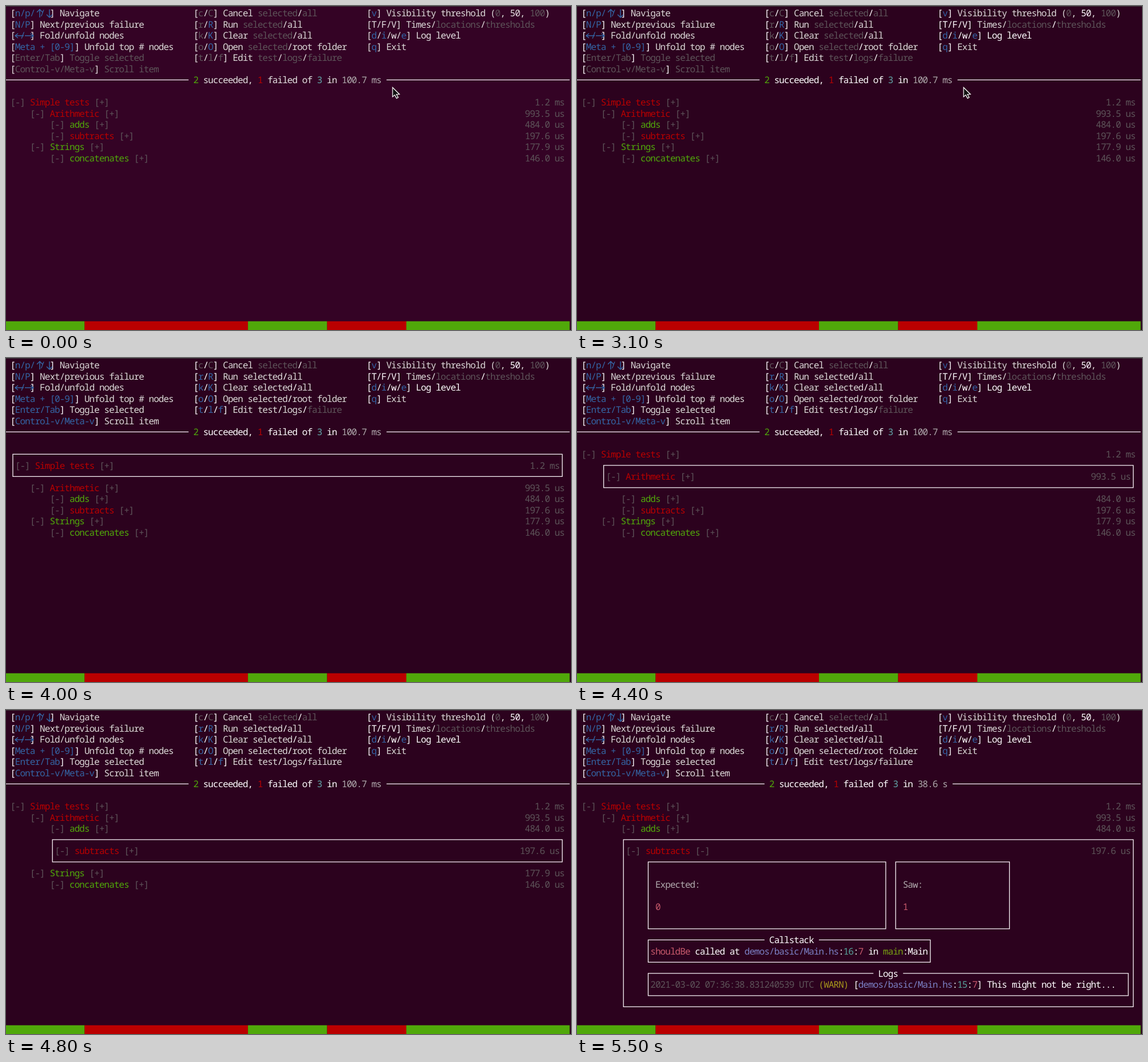
Recreate the animation shown at these times as an HTML page. Size 988 px wide and 567 px high, loop 8.8 s.

```html
<!DOCTYPE html>
<html lang="en">
<head>
<meta charset="utf-8">
<title>Test runner</title>
<style>
html, body { margin: 0; width: 100%; height: 100%; overflow: hidden; background: #2c021e; }
svg { display: block; width: 988px; height: 567px; }
text {
  font: 16px "Noto Sans Mono", "DejaVu Sans Mono", monospace;
  letter-spacing: -0.945px;
  white-space: pre;
  text-rendering: geometricPrecision;
}
.line { fill: none; stroke: #f8f4f6; stroke-width: 1.3; }
.arrow { fill: none; stroke: #3465a4; stroke-width: 1.5; }
</style>
</head>
<body>
<svg id="stage" viewBox="0 0 988 567"></svg>
<script>
const stage = document.getElementById('stage');
const LOOP = 8800, CW = 8.655, RH = 19.5, COLS = 114;

const colors = {
  w: '#dcdad8', h: '#ffffff', d: '#5d5459', b: '#3465a4', g: '#50a80a', r: '#b80000',
  c: '#62a5aa', s: '#b0aaad', p: '#c85a6c', v: '#7b80c4', t: '#56a59c', m: '#78a012', y: '#a8991c'
};

const nodes = [
  { depth: 0, name: 'Simple tests', color: 'r', time: '1.2 ms' },
  { depth: 1, name: 'Arithmetic', color: 'r', time: '993.5 us' },
  { depth: 2, name: 'adds', color: 'g', time: '484.0 us' },
  { depth: 2, name: 'subtracts', color: 'r', time: '197.6 us' },
  { depth: 1, name: 'Strings', color: 'g', time: '177.9 us' },
  { depth: 2, name: 'concatenates', color: 'g', time: '146.0 us' }
];

// start time, selected node, open, pointer shown
const states = [
  { at: 0, sel: -1, pointer: true, soft: true },
  { at: 3100, sel: -1, pointer: true },
  { at: 3600, sel: -1 },
  { at: 4000, sel: 0 },
  { at: 4400, sel: 1 },
  { at: 4500, sel: 2 },
  { at: 4800, sel: 3 },
  { at: 5500, sel: 3, open: true }
];

// left edge of a column, and the centre lines of a cell
const cellX = col => col * CW - 1;
const lineX = col => cellX(col) + CW / 2;
const lineY = row => 12.4 + row * RH;

// "~x" switches to colour x
function text(col, row, str) {
  let out = '';
  for (const run of str.split('~').slice(1)) {
    const body = run.slice(1);
    out += `<tspan x="${(cellX(col) - 0.5).toFixed(2)}" fill="${colors[run[0]]}">${body}</tspan>`;
    col += body.length;
  }
  return `<text y="${18 + row * RH}">${out}</text>`;
}

const path = (d, cls = 'line') => `<path class="${cls}" d="${d}"/>`;
const rect = (x, y, w, h, fill) => `<rect x="${x}" y="${y}" width="${w}" height="${h}" fill="${fill}"/>`;

// box in grid cells, with an optional title set into the top edge
function box(c1, r1, c2, r2, title = '', titleCol = 0) {
  const l = lineX(c1), r = lineX(c2), t = lineY(r1), b = lineY(r2);
  if (!title) return path(`M${l} ${t}H${r}V${b}H${l}Z`);
  const from = cellX(titleCol - 1), to = cellX(titleCol + title.length + 1);
  return path(`M${from} ${t}H${l}V${b}H${r}V${t}H${to}`) + text(titleCol, r1, '~h' + title);
}

function menu({ sel }) {
  const on = sel >= 0;
  const k = on ? '~b' : '~d', x = on ? '~w' : '~d', f = sel === 3 ? '~w' : '~d';
  const columns = [
    [1, [
      '~h[~bn/p/ / ~h]~w Navigate',
      '~h[~bN/P~h]~w Next/previous failure',
      '~h[~b / ~h]~w Fold/unfold nodes',
      '~h[~bMeta + [0-9]~h]~w Unfold top # nodes',
      `~h[${k}Enter/Tab~h]${x} Toggle selected`,
      `~h[${k}Control-v/Meta-v~h]${x} Scroll item`
    ]],
    [38, [
      '~h[~dc~h/~dC~h]~w Cancel ~dselected~h/~dall',
      `~h[${k}r~h/~bR~h]~w Run ${x}selected~h/~wall`,
      `~h[${k}k~h/~bK~h]~w Clear ${x}selected~h/~wall`,
      `~h[${k}o~h/~bO~h]~w Open ${x}selected~h/~wroot folder`,
      `~h[${k}t~h/${k}l~h/${k}f~h]~w Edit ${x}test~h/${x}logs~h/${f}failure`
    ]],
    [73, [
      '~h[~bv~h]~w Visibility threshold (~d0~w, ~h50~w, ~d100~w)',
      '~h[T/F/V]~w Times/~dlocations~h/~dthresholds',
      '~h[~bd~h/~bi~h/w/~be~h] Log level',
      '~h[~bq~h]~w Exit'
    ]]
  ];
  const arrows = 'M59 20V6m-5 5l5-5 5 5M76 6V20m-5-5l5 5 5-5' +
    'M31 52H16m5-4l-5 4 5 4M33 52H48m-5-4l5 4-5 4';
  return columns.map(([col, rows]) => rows.map((s, i) => text(col, i, s)).join('')).join('') +
    path(arrows, 'arrow');
}

function summary({ open }) {
  const time = open ? '38.6 s' : '100.7 ms';
  const col = open ? 39 : 38, end = col + 30 + time.length;
  const y = lineY(6);
  return path(`M0 ${y}H${cellX(col - 1)}M${cellX(end + 1)} ${y}H${cellX(COLS)}`) +
    text(col, 6, `~g2~h succeeded, ~r1~h failed of ~c3~h in ~s${time}`);
}

function details() {
  return box(14, 13, 62, 19) + text(16, 15, '~sExpected:') + text(16, 17, '~p0') +
    box(64, 13, 87, 19) + text(66, 15, '~sSaw:') + text(66, 17, '~p1') +
    box(14, 20, 71, 22, 'Callstack', 39) +
    text(15, 21, '~pshouldBe~h called at ~vdemos/basic/Main.hs~h:~t16~h:~p7~h in ~mmain~h:Main') +
    box(14, 23, 111, 25, 'Logs', 61) +
    text(15, 24, '~d2021-03-02 07:36:38.831240539 UTC ~y(WARN)~h [~vdemos/basic/Main.hs~h:~t15~h:~p7~h] This might not be right...');
}

function tree({ sel, open }) {
  let row = 8, out = '';
  for (const [i, n] of nodes.entries()) {
    const picked = i === sel, shift = picked ? 1 : 0;
    const col = 1 + n.depth * 4;
    const fold = picked && open ? '[-]' : '[+]';
    out += text(col + shift, row + shift, `~d[-] ~${n.color}${n.name}~d ${fold}`) +
      text(COLS - 1 - shift - n.time.length, row + shift, '~d' + n.time);
    if (picked) out += box(col, row, 112, open ? 26 : row + 2);
    if (picked && open) return out + details();
    row += picked ? 3 : 1;
  }
  return out;
}

function progressBar() {
  const stops = [0, 16, 49, 65, 81, COLS].map(col => Math.max(0, cellX(col)));
  return stops.slice(1).map((end, i) =>
    rect(stops[i], 551.7, end - stops[i], 16, i % 2 ? '#ba0000' : '#50a80a')).join('');
}

const pointer = '<path d="M676 142.5V159l3.8-3.4 3.2 6 2.8-1.5-3-5.6h5.2z" fill="#111" stroke="#fff" stroke-width="1.2"/>';

function render(state) {
  colors.h = state.soft ? '#e6e3e3' : '#ffffff';
  stage.innerHTML = rect(0, 0, 988, 567, state.soft ? '#340325' : '#2c021e') +
    rect(0, 0, 988, 1, '#3b363a') +
    menu(state) + summary(state) + tree(state) + progressBar() +
    (state.pointer ? pointer : '');
}

let shown;
const start = performance.now();
function tick() {
  const t = (performance.now() - start) % LOOP;
  const state = states.findLast(s => s.at <= t);
  if (state !== shown) render(shown = state);
  requestAnimationFrame(tick);
}
tick();
</script>
</body>
</html>
```
